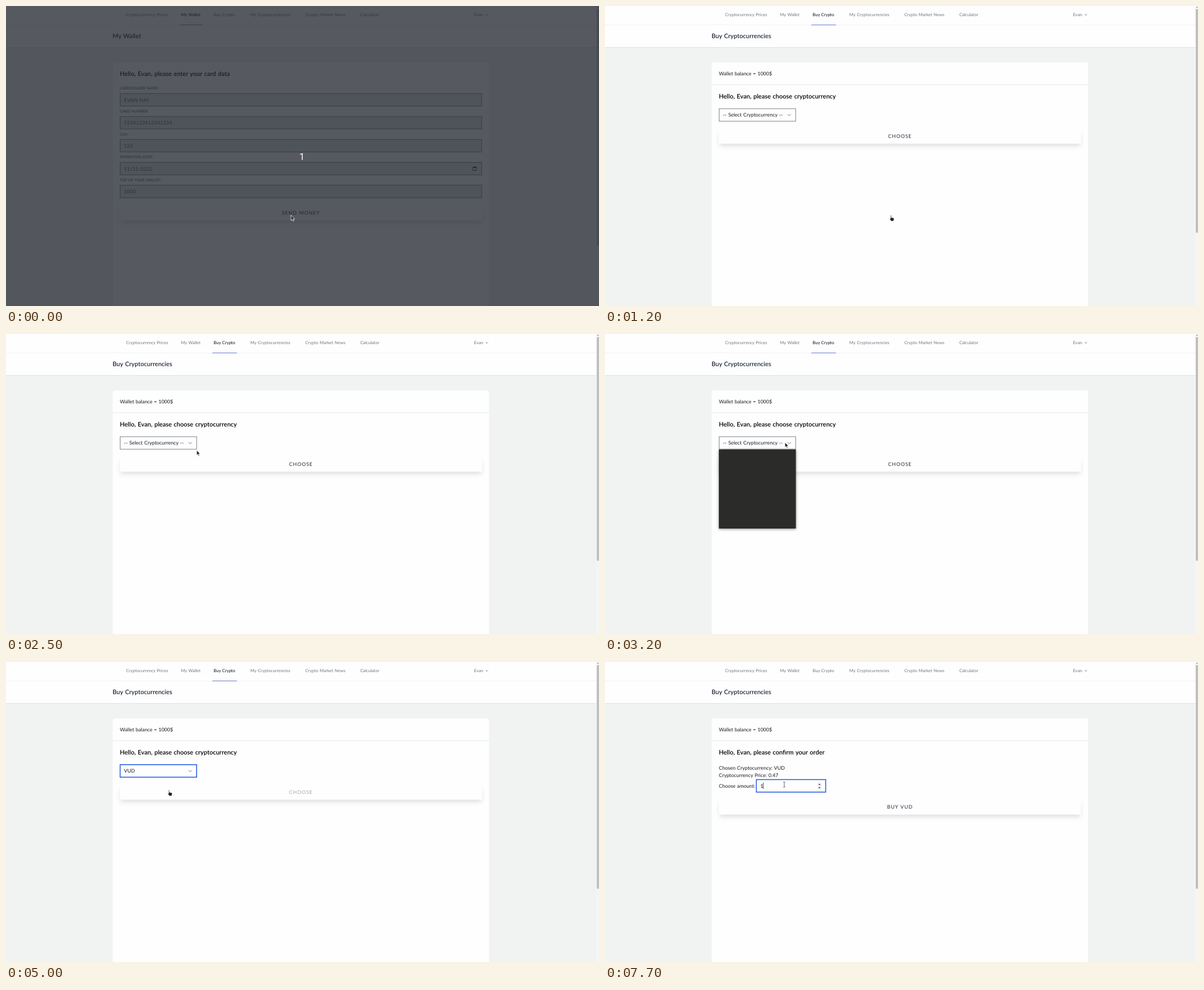
Recreate the animation shown at these times as an HTML page. Size 1052x532 px, loop 8000 ms.

```html
<!DOCTYPE html>
<html lang="en">
<head>
<meta charset="utf-8">
<title>Wallet demo</title>
<style>
  html, body { margin: 0; height: 100%; overflow: hidden; background: #f1f3f3; }
  svg { display: block; width: 100vw; height: 100vh; }
  text { font: 8.9px Lato, "Open Sans", sans-serif; word-spacing: .067em; text-rendering: geometricPrecision; fill: #15191f; white-space: pre; }
  .nav { font-size: 7.62px; font-weight: 500; fill: #7a808a; }
  .active { fill: #1b2230; }
  .title { font-size: 11px; font-weight: 600; fill: #1f2937; }
  .greeting { font-size: 11px; font-weight: 600; fill: #000; }
  .label { font-size: 6.7px; fill: #3f4856; }
  .value { fill: #4b5563; letter-spacing: .02em; }
  .button { letter-spacing: .1em; text-anchor: middle; fill: #1f2937; }
  .muted { fill: #a3a9ad; }
  .hint { fill: #747a85; letter-spacing: .02em; }
  .option { fill: #f2f2f2; }
  .count { font: 17px Roboto, "Open Sans", sans-serif; fill: #fff; text-anchor: middle; }
  .lift { filter: drop-shadow(0 5px 4px rgba(0, 0, 0, .13)); }
  .popup { filter: drop-shadow(0 1px 2.5px rgba(0, 0, 0, .45)); }
  .line { fill: none; stroke: #5f6671; stroke-width: .9; }
</style>
</head>
<body>
<svg id="stage" viewBox="0 0 1052 532" preserveAspectRatio="none"></svg>
<script>
const LOOP = 8000, STEP = 100;
const USER = 'Evan', COIN = 'VUD';
const BLUE = '#2860e0', BORDER = '#7b818c';

const NAV = [
  [213, 'Cryptocurrency Prices'], [310.3, 'My Wallet'], [368.3, 'Buy Crypto'],
  [433.5, 'My Cryptocurrencies'], [531, 'Crypto Market News'], [628.4, 'Calculator']
];
const FIELDS = [
  ['CARDHOLDER NAME:', 'EVAN HAY'], ['CARD NUMBER:', '1234123412341234'], ['CVV:', '123'],
  ['EXPIRATION DATE:', '11/11/2222'], ['TOP UP YOUR WALLET:', '1000']
];
const OPTIONS = ['-- Select Cryptocurrency --', COIN, 'BQO', 'DULN', 'EVQ', 'KOZ', 'LQM', 'NUV', 'QOR', 'ZUB'];

// Pointer poses: start time, hotspot, shape
const POINTER = [
  [0, 505.5, 371, 'arrow'], [100, 505.5, 371, 'hand'], [1300, 505.5, 371, 'arrow'],
  [2000, 450, 305, 'arrow'], [2100, 371, 228, 'hand'],
  [2400, 358, 220, 'hand'], [2500, 338, 206, 'arrow'], [2600, 324, 196, 'arrow'], [2700, 319, 192, 'arrow'],
  [3700, 308, 199, 'arrow'], [3800, 287, 211, 'arrow'], [3900, 268, 221, 'arrow'], [4000, 262, 224, 'arrow'],
  [4500, 262, 224, 'hand'], [5000, 287.5, 227, 'hand'], [5100, 310, 229, 'hand'],
  [5200, 325, 231, 'hand'], [5300, 330, 232, 'hand'], [5800, 330, 232, 'arrow'],
  [6600, 324, 226, 'beam'], [6700, 320, 220, 'beam'], [6800, 318, 217.3, 'beam']
];
const SHAPES = {
  arrow: '<path d="M.2 0V9.2L2.3 7.2 3.8 10.6 5.3 9.9 3.8 6.7H6.6Z" fill="#222" stroke="#fff" stroke-width=".8"/>',
  hand: '<path d="M1 .6Q1.7-.4 2.4.6V4L6.5 4.9Q7.4 5.2 7.2 6.6L6.4 10.4H2.2L-.6 6.6Q-.5 5.4 1 6.4Z" fill="#222" stroke="#fff" stroke-width=".6"/>',
  beam: '<path d="M-2-4.4Q0-4.6 0-3.6Q0-4.6 2-4.4M0-3.8V3.8M-2 4.4Q0 4.6 0 3.6Q0 4.6 2 4.4" fill="none" stroke="#555" stroke-width=".9"/>'
};

const text = (x, y, content, style = '') => `<text x="${x}" y="${y}" class="${style}">${content}</text>`;
const rect = (x, y, w, h, fill, extra = '') => `<rect x="${x}" y="${y}" width="${w}" height="${h}" fill="${fill}" ${extra}/>`;
const path = (d, extra = 'class="line"') => `<path d="${d}" ${extra}/>`;

function box(x, y, w, h, fill, focused) {
  const stroke = focused ? `stroke="${BLUE}" stroke-width="1.6"` : `stroke="${BORDER}" stroke-width="1"`;
  return rect(x + .5, y + .5, w - 1, h - 1, fill, stroke);
}

function button(y, label, pointer) {
  const hover = pointer[3] === 'hand' && pointer[2] >= y && pointer[2] < y + 26;
  return rect(203.6, y + 2, 639.4, 22.6, '#fff', 'class="lift"') + rect(202, y, 642.4, 26, '#fefefe') +
    text(523.3, y + 15.7, label, 'button' + (hover ? ' muted' : ''));
}

function frame(title, active, thumbEnd) {
  const links = NAV.map(([x, name]) => text(x, 18.2, name, 'nav' + (name === active ? ' active' : '')));
  const underline = { 'My Wallet': [308.3, 40.2], 'Buy Crypto': [366, 43.6] }[active];
  return rect(0, 0, 1052, 532, '#f1f3f3') +
    rect(0, 73, 1047.5, 1.2, '#dfe2e4') + rect(0, 0, 1047.5, 73, '#fefefe') +
    rect(0, 33, 1047.5, .8, '#eeeff2') + links.join('') +
    (underline ? rect(underline[0], 33, underline[1], 1.1, '#7882d2') : '') +
    text(830.3, 17.9, USER, 'nav') + path('M851 14.5L853 16.5 855 14.5') +
    text(189, 57.2, title, 'title') +
    rect(188.8, 99.7, 668.6, 460, '#fefefe', 'rx="4" stroke="#e9ebec" stroke-width=".5"') +
    rect(1047.5, 0, 4.5, 532, '#f5f5f5') + rect(1048, 5.5, 4, thumbEnd - 5.5, '#bfbfbf') +
    path('M1048.5 3L1050 1.2 1051.5 3Z', 'fill="#777"');
}

function walletPage(pointer) {
  const rows = FIELDS.map(([label, value], i) => {
    const y = 154.8 + i * 40.65;
    return text(202, y - 6.5, label, 'label') + box(202, y, 642.4, 23.2, '#e3e6ea') + text(209.3, y + 14.8, value, 'value');
  });
  const calendar = rect(828.6, 285.5, 5.8, 5.8, 'none', 'stroke="#222" stroke-width=".8"') +
    rect(828.4, 285.2, 6.2, 1.7, '#222') + path('M829.8 284V285.5M833.2 284V285.5');
  return frame('My Wallet', 'My Wallet', 425) + text(202, 124, `Hello, ${USER}, please enter your card data`, 'greeting') +
    rows.join('') + calendar + button(354, 'SEND MONEY', pointer);
}

const balance = action => text(202, 122.7, 'Wallet balance = 1000$') + rect(189, 139, 668.2, 1, '#e6e8ea') +
  text(202, 164.3, `Hello, ${USER}, please ${action}`, 'greeting');

function popup(t) {
  const highlighted = t >= 3900 ? 1 : 0;
  const rows = OPTIONS.map((name, i) =>
    (i === highlighted ? rect(202, 205 + i * 14, 136.6, 14, '#555') : '') + text(209.3, 215 + i * 14, name, 'option'));
  return rect(202, 204.8, 136.6, 140.2, '#2b2b2a', 'class="popup"') + (t >= 3300 ? rows.join('') : '');
}

function choosePage(t, pointer) {
  return frame('Buy Cryptocurrencies', 'Buy Crypto', 402) + balance('choose cryptocurrency') +
    button(218.2, 'CHOOSE', pointer) + box(202, 181.6, 136.7, 23.2, '#fefefe', t >= 3300 && t < 5500) +
    text(209.3, 196.2, t < 4500 ? OPTIONS[0] : COIN) + path('M323.9 191.8L326.9 194.8 329.9 191.8') +
    (t >= 3200 && t < 4500 ? popup(t) : '');
}

function confirmPage(t, pointer) {
  const typed = t >= 7700;
  const caret = t >= 7000 && t < 7500 ? 275.2 : typed ? 280.4 : 0;
  const spinner = rect(377, 213.6, 7, 12.4, '#efefef') +
    path('M378.6 218L380.5 215.8 382.4 218ZM378.6 222L380.5 224.2 382.4 222Z', 'fill="#444"');
  return frame('Buy Cryptocurrencies', '', 402) + balance('confirm your order') +
    text(202, 191.2, `Chosen Cryptocurrency: ${COIN}`) + text(202, 204.4, 'Cryptocurrency Price: 0.47') +
    text(202, 222.5, 'Choose amount:') + box(268, 208, 124, 23.2, '#fefefe', t >= 7000) +
    text(275.6, 222.5, typed ? '1' : '100', typed ? '' : 'hint') +
    (caret ? rect(caret, 214, .8, 11, '#111') : '') + (t >= 6600 ? spinner : '') +
    button(244.7, `BUY ${COIN}`, pointer);
}

function scene(t) {
  const pointer = POINTER.findLast(pose => pose[0] <= t);
  const page = t < 1200 ? walletPage(pointer) : t < 5700 ? choosePage(t, pointer) : confirmPage(t, pointer);
  const countdown = rect(0, 0, 1052, 532, '#24282f', 'opacity=".77"') + text(525, 272.5, '1', 'count');
  return page + (t < 100 ? countdown : '') +
    `<g transform="translate(${pointer[1]} ${pointer[2]})">${SHAPES[pointer[3]]}</g>`;
}

const stage = document.getElementById('stage');
let shown = -1;
function draw() {
  const t = Math.floor(performance.now() % LOOP / STEP) * STEP;
  if (t !== shown) stage.innerHTML = scene(shown = t);
  requestAnimationFrame(draw);
}
draw();
</script>
</body>
</html>
```
